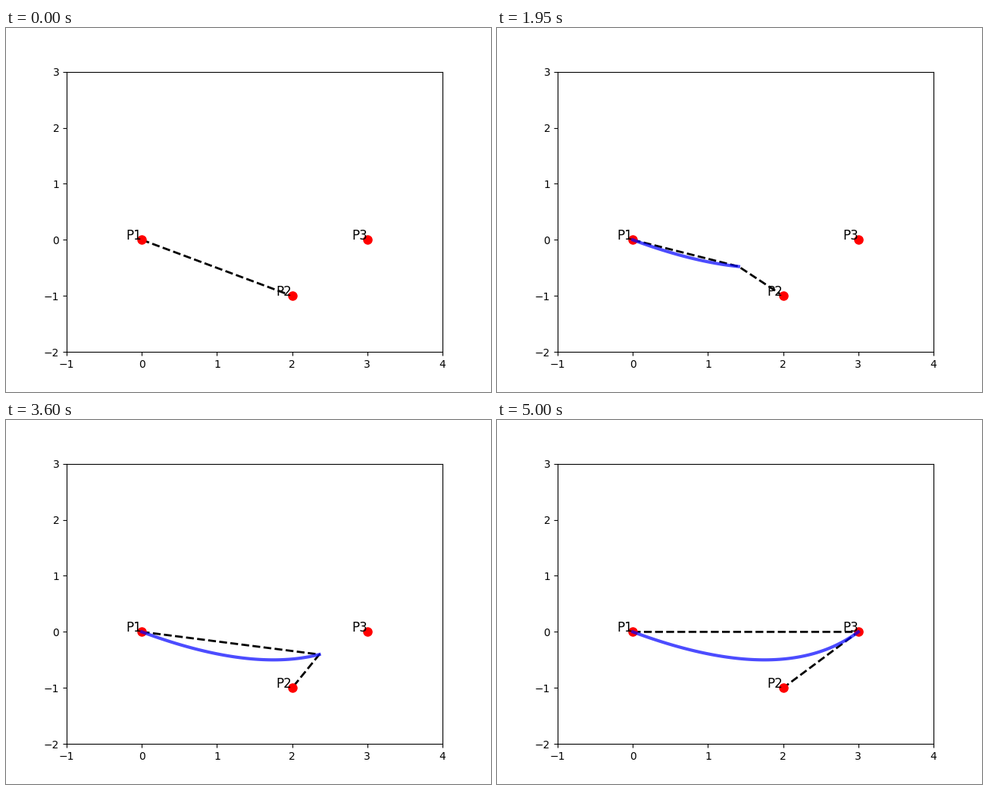
Animation, 640 px wide and 480 px high, one loop 5.05 s. Source, as a matplotlib script:

```python
import numpy as np
import matplotlib.pyplot as plt
from matplotlib.animation import FuncAnimation

STEPS = 100
P1, P2, P3 = np.array([[0, 0], [2, -1], [3, 0]], dtype=float)


def bezier(t):
    """Quadratic Bezier points for an array of parameters t."""
    t = np.asarray(t)[:, None]
    return (1 - t) ** 2 * P1 + 2 * t * (1 - t) * P2 + t ** 2 * P3


curve_points = bezier(np.linspace(0, 1, STEPS + 1))

fig, ax = plt.subplots(figsize=(6.4, 4.8), dpi=100)
ax.set_xlim(-1, 4)
ax.set_ylim(-2, 3)

arms, = ax.plot([], [], "k--", lw=2)
for name, point in zip(("P1", "P2", "P3"), (P1, P2, P3)):
    ax.plot(*point, "ro", markersize=8)
    ax.text(*point, name, fontsize=12, ha="right")
curve, = ax.plot([], [], "b-", lw=3, alpha=0.7)


def update(i):
    arms.set_data(*np.array([P1, curve_points[i], P2]).T)
    curve.set_data(*curve_points[:i + 1].T)
    return arms, curve


anim = FuncAnimation(fig, update, frames=STEPS + 1, interval=50,
                     repeat=True, repeat_delay=0)
plt.show()
```
